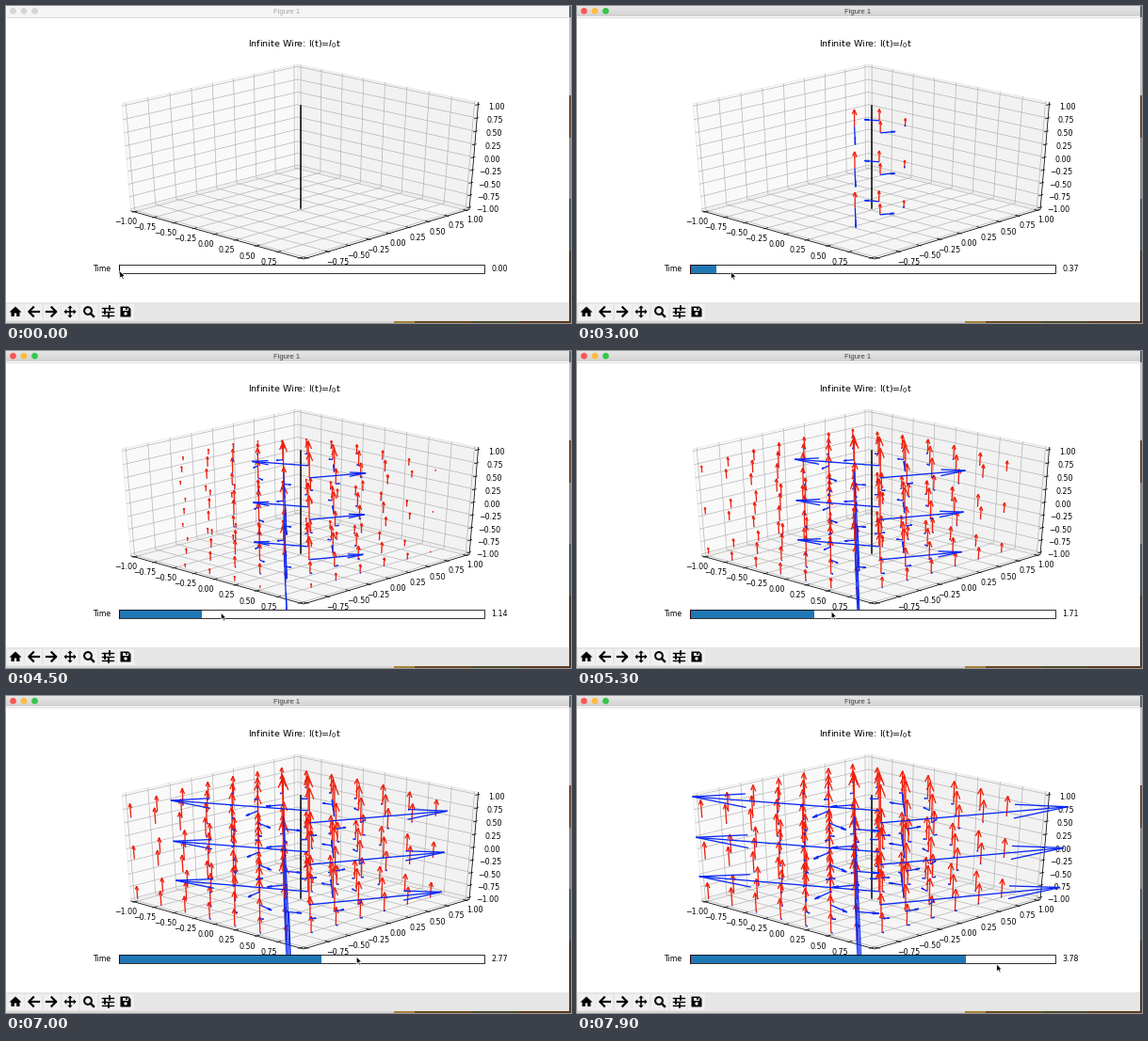
Animation of 600 by 337 pixels, one loop 8 s. Source, as a matplotlib script:

```python
import numpy as np
import matplotlib.pyplot as plt
from matplotlib.animation import FuncAnimation
from matplotlib.collections import LineCollection
from matplotlib.patches import Circle, Polygon, Rectangle

W, H, STEP, FRAMES = 600, 337, 100, 80
PT = 0.72                      # points per pixel at 100 dpi
FONT = 7.85
EDGE = 1 + 1 / 24              # panes reach a little past the limits
TICKS = np.linspace(-1, 1, 9)
BLUE, RED = "#0a28f5", "#f01e0a"

fig = plt.figure(figsize=(W / 100, H / 100), dpi=100, facecolor="white")
ax = fig.add_axes([0, 0, 1, 1])
ax.set_xlim(0, W)
ax.set_ylim(H, 0)
ax.axis("off")

# ---- camera ----
AZ, EL = np.radians([-46, 30])
RIGHT = np.array([-np.sin(AZ), np.cos(AZ), 0])
TOWARD = np.array([np.cos(EL) * np.cos(AZ), np.cos(EL) * np.sin(AZ), np.sin(EL)])
UP = np.cross(TOWARD, RIGHT)


def project(p):
    """3D data points (..., 3) to stage pixels (..., 2)."""
    p = np.asarray(p, float) / 2
    depth = 10 - p @ TOWARD
    return np.stack([312.6 + 2503 * (p @ RIGHT) / depth,
                     161.6 - 1261 * (p @ UP) / depth], axis=-1)


# ---- drawing helpers ----
def rect(x, y, w, h, color, z=1, **kw):
    return ax.add_patch(Rectangle((x, y), w, h, fc=color, lw=0, zorder=z, **kw))


def poly(pts, color, z=1, **kw):
    kw.setdefault("lw", 0)
    return ax.add_patch(Polygon(pts, fc=color, zorder=z, **kw))


def line(pts, color="black", lw=0.7, z=2, **kw):
    xs, ys = np.transpose(pts)
    return ax.plot(xs, ys, color=color, lw=lw * PT, zorder=z, **kw)[0]


def label(x, y, s, size=FONT, ha="center", z=4, **kw):
    return ax.text(x, y + 0.365 * size, s, fontsize=size * PT, ha=ha,
                   va="baseline", zorder=z, **kw)


# ---- plot box ----
def draw_box():
    e = EDGE
    panes = [([(-e, -e, -e), (-e, e, -e), (-e, e, e), (-e, -e, e)], "0.975"),
             ([(-e, e, -e), (e, e, -e), (e, e, e), (-e, e, e)], "0.95"),
             ([(-e, -e, -e), (e, -e, -e), (e, e, -e), (-e, e, -e)], "0.9625")]
    for corners, shade in panes:
        poly(project(corners), shade, ec="0.9", lw=0.5)
    for t in TICKS:
        for path in ([(t, -e, -e), (t, e, -e), (t, e, e)],
                     [(e, t, -e), (-e, t, -e), (-e, t, e)],
                     [(-e, -e, t), (-e, e, t), (e, e, t)]):
            line(project(path), "#b0b0b0", 0.65)
    line(project([(-e, -e, -e), (e, -e, -e), (e, e, -e), (e, e, e)]), lw=0.75, z=3)

    out, back, far = e + 1 / 60, e - 1 / 30, e + 0.108
    for t in TICKS:
        text = f"{t:.2f}".replace("-", "\u2212")
        for a, b, spot in (((t, -out, -e), (t, -back, -e), (t, -far, -far)),
                           ((out, t, -e), (back, t, -e), (far, t, -far)),
                           ((e, out, t), (e, back, t), (far, far, t))):
            line(project([a, b]), lw=0.7, z=3)
            x, y = project(spot)
            label(x, y + 2.3, text)
    line(project([(0, 0, -1), (0, 0, 1)]), lw=1.5, z=4)
    label(306, 40, "Infinite Wire: I(t)=$I_0$t", 9.5)


# ---- window ----
def draw_toolbar():
    rect(0, 315, 597.5, 20.3, "#e6e6e6")
    mids = [10, 29, 48.5, 68, 88, 107.5, 127]
    for m in mids:
        rect(m - 9, 316.5, 18, 17.5, "#f0f0f0", 2)
    y = 325
    home, left, right, move, zoom, tune, save = mids
    poly([(home - 6.5, y + 0.5), (home, y - 5.5), (home + 6.5, y + 0.5)], "black", 3)
    poly([(home - 4.5, y), (home, y - 4), (home + 4.5, y), (home + 4.5, y + 5),
          (home + 1.2, y + 5), (home + 1.2, y + 1.5), (home - 1.2, y + 1.5),
          (home - 1.2, y + 5), (home - 4.5, y + 5)], "black", 3)
    for m, s in ((left, 1), (right, -1)):
        line([(m - 4.5 * s, y), (m + 5.5 * s, y)], lw=2.2, z=3)
        line([(m, y - 4.7), (m - 4.7 * s, y), (m, y + 4.7)], lw=2.2, z=3)
    for dx, dy in ((1, 0), (-1, 0), (0, 1), (0, -1)):
        line([(move, y), (move + 4.5 * dx, y + 4.5 * dy)], lw=1.6, z=3)
        poly([(move + 6.5 * dx, y + 6.5 * dy),
              (move + 3.8 * dx + 2.7 * dy, y + 3.8 * dy + 2.7 * dx),
              (move + 3.8 * dx - 2.7 * dy, y + 3.8 * dy - 2.7 * dx)], "black", 3)
    ax.add_patch(Circle((zoom - 1, y - 1), 3.9, fc="none", ec="black",
                        lw=2 * PT, zorder=3))
    line([(zoom + 2, y + 2), (zoom + 5, y + 5)], lw=2.4, z=3)
    for dy, knob in ((-4, 2.5), (0, -2.5), (4, 1)):
        line([(tune - 6, y + dy), (tune + 6, y + dy)], lw=1.4, z=3)
        line([(tune + knob, y + dy - 1.8), (tune + knob, y + dy + 1.8)], lw=1.8, z=3)
    poly([(save - 5.5, y - 5.5), (save + 3, y - 5.5), (save + 5.5, y - 3),
          (save + 5.5, y + 5.5), (save - 5.5, y + 5.5)], "black", 3)
    rect(save - 3.5, y - 4.3, 6, 3, "#f0f0f0", 4)
    rect(save + 0.4, y - 4, 1.3, 2.3, "black", 5)
    ax.add_patch(Circle((save, y + 2), 1.7, fc="#f0f0f0", lw=0, zorder=4))


def draw_desktop():
    strip = [(0, 12, "#5b6478"), (12, 95, "#c9c3c8"), (95, 140, "#6b4a3c"),
             (140, 205, "#8d8588"), (205, 260, "#53555f"), (260, 337, "#4a3a2c")]
    for top, end, color in strip:
        rect(597.5, top, 2.5, end - top, color)
    rect(0, 335.3, 412, 1.7, "#d8d6d4")
    for x, w, color in ((412, 22, "#a8823c"), (434, 60, "#6a4c22"),
                        (494, 50, "#4f4a2a"), (544, 56, "#5a3a1e")):
        rect(x, 335.3, w, 1.7, color)


draw_desktop()
draw_box()
draw_toolbar()

ax.imshow(np.linspace(0.91, 0.82, 12)[:, None], cmap="gray", vmin=0, vmax=1,
          extent=(0, 597.5, 11.5, 0), aspect="auto", zorder=1)
idle_bar = rect(0, 0, 597.5, 11.5, "#f5f5f5", 1.5)
line([(0, 11.6), (597.5, 11.6)], "#c8c8c8", 0.6)
LIGHTS = ["#fc5753", "#fdbc40", "#33c748"]
lights = [ax.add_patch(Circle((x, 5.3), 3.4, lw=0, zorder=3)) for x in (7.5, 19, 30.5)]
caption = label(298, 5.4, "Figure 1", 7.6, family="Liberation Sans")

# ---- slider ----
X0, X1, Y0, Y1 = 119.5, 507.8, 275.3, 284.3
rect(X0, Y0, X1 - X0, Y1 - Y0, "white", 10)
fill = rect(X0, Y0, 0, Y1 - Y0, "#1f77b4", 11)
line([(X0, Y0), (X0, Y1)], "red", 1.1, 12)
ax.add_patch(Rectangle((X0, Y0), X1 - X0, Y1 - Y0, fc="none", ec="black",
                       lw=0.8 * PT, zorder=13))
label(111.5, 279.6, "Time", ha="right", z=13)
value = label(515.5, 279.6, "0.00", ha="left", z=13)

# ---- fields around the wire ----
side = np.arange(-1, 1, 0.3)
grid = np.stack(np.meshgrid(side, side, np.arange(-1, 1, 0.8)), -1).reshape(-1, 3)
dist = np.hypot(grid[:, 0], grid[:, 1])
plot_area = Polygon([(75, 48.4), (538, 48.4), (538, 281.7), (75, 281.7)],
                    transform=ax.transData)


def field_lines(color, z):
    lines = LineCollection([], colors=color, linewidths=1.3 * PT, zorder=z)
    ax.add_collection(lines, autolim=False)
    lines.set_clip_path(plot_area)
    return lines


electric = field_lines(RED, 6)
magnetic = field_lines(BLUE, 7)


def tilt(v, angle):
    """Rotate each vector about its horizontal normal."""
    n = np.hypot(v[:, 0], v[:, 1])
    flat = n < 1e-9
    n = np.where(flat, 1, n)
    axis = np.stack([np.where(flat, 0, v[:, 1] / n),
                     np.where(flat, 1, -v[:, 0] / n), 0 * n], -1)
    along = (v * axis).sum(1, keepdims=True)
    c, s = np.cos(angle), np.sin(angle)
    return v * c + np.cross(axis, v) * s + axis * along * (1 - c)


def arrows(base, v):
    tip = base + v
    ends = [base] + [tip - 0.3 * tilt(v, a) for a in np.radians([15, -15])]
    return np.concatenate([np.stack([project(e), project(tip)], 1) for e in ends])


def fields(t):
    near = dist < t
    if not near.any():
        return [], []
    p, s = grid[near], dist[near]
    root = np.sqrt(t * t - s * s)
    zero = 0 * s
    e = np.stack([zero, zero, 0.2 * np.log((t + root) / s)], -1)
    size = 0.005 * root / s ** 4
    b = np.stack([-p[:, 1] * size, p[:, 0] * size, zero], -1)
    return arrows(p, e), arrows(p, b)


# ---- pointer ----
ARROW = 0.85 * np.array([(0, 0), (0, 9.4), (2.2, 7.4), (3.7, 10.8), (5.2, 10.2),
                         (3.7, 6.8), (6.6, 6.8)])
pointer = poly(ARROW, "black", 20, ec="white", lw=0.5)

KEYS = [0, 1000, 1700, 3000, 4500, 6100, 7000, 7900]
TIME = [0, 0, 0.02, 0.37, 1.14, 2.27, 2.77, 3.78]
PX = [120.8, 121, 122.8, 163.5, 228.3, 312, 372.2, 445.7]
PY = [281.5, 281.5, 281, 282.3, 278, 275.5, 277, 285]

ax.set_xlim(0, W)
ax.set_ylim(H, 0)


def draw(i):
    ms = i * STEP
    t = np.interp(ms, KEYS, TIME)
    active = ms >= 200
    idle_bar.set_visible(not active)
    caption.set_color("#404040" if active else "#a8a8a8")
    for dot, color in zip(lights, LIGHTS):
        dot.set_facecolor(color if active else "#d6d6d6")
    fill.set_width((X1 - X0) * t / 5)
    value.set_text(f"{t:.2f}")
    e, b = fields(t)
    electric.set_segments(e)
    magnetic.set_segments(b)
    pointer.set_xy(ARROW + (np.interp(ms, KEYS, PX), np.interp(ms, KEYS, PY)))
    return []


anim = FuncAnimation(fig, draw, frames=FRAMES, interval=STEP,
                     init_func=lambda: draw(0), repeat=True, repeat_delay=0)
plt.show()
```
